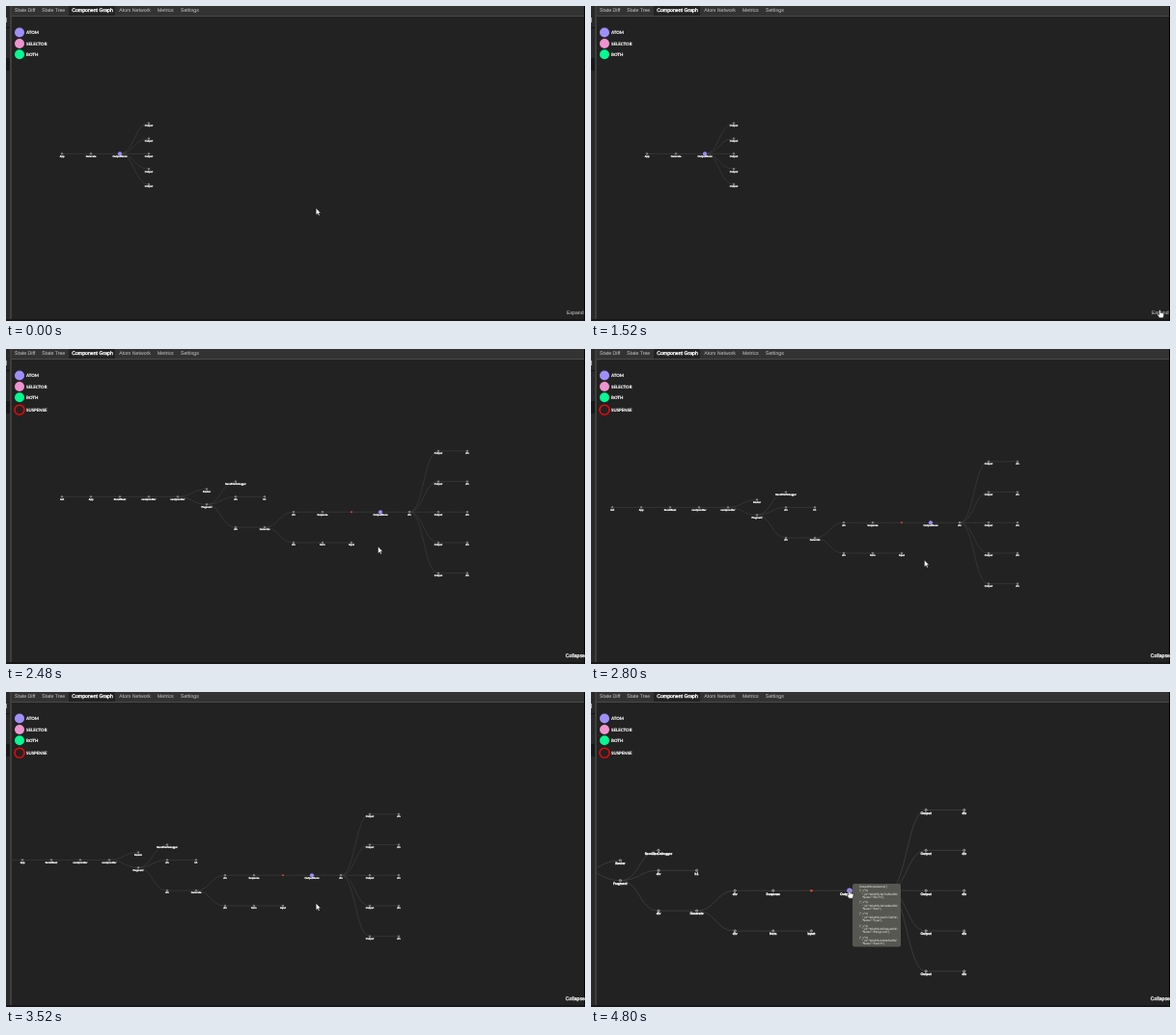
An HTML page that plays this animation: 600x327 px, repeating every 5920 ms.

```html
<!DOCTYPE html>
<html lang="en">
<head>
<meta charset="utf-8">
<title>Component Graph</title>
<style>
html, body { margin: 0; width: 100%; height: 100%; overflow: hidden; background: #222; }
svg { display: block; width: 600px; height: 327px; font-family: "Liberation Sans", Arial, sans-serif; font-size: 5.2px; }
text { text-rendering: geometricPrecision; }
.tab { fill: #b4b4b4; stroke: #b4b4b4; stroke-width: .08px; }
.on { fill: #fff; stroke: #fff; stroke-width: .32px; }
.legend { font: bold 4.4px Lato, sans-serif; fill: #fff; stroke: #fff; stroke-width: .15px; }
.node text { font: bold 2.6px Lato, sans-serif; fill: #fff; stroke: #fff; stroke-width: .22px; text-anchor: middle; }
.node circle { fill: #666; stroke: #bbb; stroke-width: .4px; }
.node .atom { fill: #9a8cff; stroke: none; }
.node .hot { fill: #f0442e; stroke: none; }
.link { fill: none; stroke: #414141; stroke-width: .6px; }
#tip text { font: 3px Lato, sans-serif; fill: #fff; }
</style>
</head>
<body>
<svg viewBox="0 0 600 327">
  <defs><clipPath id="pane"><rect x="6" y="11" width="593" height="314"/></clipPath></defs>
  <rect width="600" height="327" fill="#222"/>
  <rect width="600" height="10" fill="#333"/>
  <rect x="65" width="48" height="10" fill="#222"/>
  <rect y="10" width="600" height="1" fill="#484848"/>
  <rect width="4" height="327" fill="#292929"/>
  <rect y="22" width="4" height="1" fill="#111"/>
  <rect y="54" width="4" height="13" fill="#181818"/>
  <rect y="12" width="1" height="5" fill="#999"/>
  <rect x="4" width="2" height="327" fill="#3d3d3d"/>
  <rect y="325" width="600" height="2" fill="#191717"/>
  <rect x="599" width="1" height="327" fill="#000"/>
  <g id="ui"></g>
  <g clip-path="url(#pane)"><g id="view"></g></g>
  <text id="toggle" y="319.7"></text>
  <g id="tip"><rect x="271" y="199" width="50" height="65.5" rx="2" fill="#575752"/></g>
  <path id="arrow" d="M0 0V7.2L1.7 5.7L2.8 8.1L4 7.6L2.9 5.2H5Z" fill="#fff" stroke="#111" stroke-width=".5"/>
  <path id="hand" d="M-.8 .7Q0-.5 .8 .7V3L3.6 3.6Q4.4 3.9 4.2 5L3.5 8.2H-.4L-2.6 5.2Q-2.6 4.1-1.6 4.5L-.8 5.2Z" fill="#fff" stroke="#111" stroke-width=".5"/>
</svg>
<script>
const LOOP = 5920, STEP = 80, CLICK = 1600, GROW = 750, ROW = 15.85, ROOT = [58, 153.4];
const $ = id => document.getElementById(id);

function add(parent, tag, attrs, text) {
  const el = document.createElementNS("http://www.w3.org/2000/svg", tag);
  for (const k in attrs) el.setAttribute(k, attrs[k]);
  if (text) el.textContent = text;
  return parent.appendChild(el);
}
const show = (el, on) => el.setAttribute("visibility", on ? "visible" : "hidden");

// Tabs and legend
[["State Diff", 9], ["State Tree", 37.3], ["Component Graph", 68.2], ["Atom Network", 117.3], ["Metrics", 157], ["Settings", 181]]
  .forEach(([s, x], i) => add($("ui"), "text", { x, y: 5.5, class: i == 2 ? "tab on" : "tab" }, s));
function legend(y, name, style) {
  const g = add($("ui"), "g", {});
  add(g, "circle", { cx: 14, cy: y, r: 5, ...style });
  add(g, "text", { x: 21, y: y + 1.8, class: "legend" }, name);
  return g;
}
legend(27.5, "ATOM", { fill: "#a08ffa" });
legend(39, "SELECTOR", { fill: "#f094d0" });
legend(50.3, "BOTH", { fill: "#05fa92" });
const suspense = legend(63.2, "SUSPENSE", { fill: "none", stroke: "#e60a0a", "stroke-width": 1.6 });

// A node is [label, column, row, parent index]
const outputs = (col, mid, gap, parent) => [-2, -1, 0, 1, 2].map(i => ["Output", col, mid + i * gap, parent]);
const small = [["App", 0, 0], ["Generate", 1, 0, 0], ["OutputMenu", 2, 0, 1], ...outputs(3, 0, 1, 2)];
const full = [
  ["null", 0, 0], ["App", 1, 0, 0], ["RecoilRoot", 2, 0, 1], ["nextprovider", 3, 0, 2], ["nextprovider", 4, 0, 3],
  ["Router", 5, -.5, 4], ["Fragment", 5, .5, 4], ["RecoilizeDebugger", 6, -1, 6],
  ["div", 6, 0, 6], ["h1", 7, 0, 8], ["div", 6, 2, 6], ["Generate", 7, 2, 10],
  ["div", 8, 1, 11], ["Suspense", 9, 1, 12], ["", 10, 1, 13], ["OutputMenu", 11, 1, 14], ["div", 12, 1, 15],
  ["div", 8, 3, 11], ["form", 9, 3, 17], ["input", 10, 3, 18],
  ...outputs(13, 1, 2, 16),
  ...[0, 1, 2, 3, 4].map(i => ["div", 14, -3 + 2 * i, 20 + i])
];

function buildTree(list) {
  const g = add($("view"), "g", {});
  const links = list.map(() => add(g, "path", { class: "link" }));
  const nodes = list.map(([name]) => {
    const n = add(g, "g", { class: "node" });
    const kind = { OutputMenu: "atom", "": "hot" }[name] || "";
    add(n, "circle", { r: kind == "atom" ? 2.1 : .9, class: kind });
    add(n, "text", { y: 3.3 }, name);
    return n;
  });
  function place(p) {
    const at = ([, c, r]) => [ROOT[0] + 30 * c * p, ROOT[1] + ROW * r * p];
    list.forEach((d, i) => {
      const [x, y] = at(d);
      nodes[i].setAttribute("transform", `translate(${x} ${y})`);
      if (d[3] === undefined) return;
      const [px, py] = at(list[d[3]]), mid = (px + x) / 2;
      links[i].setAttribute("d", `M${px} ${py}C${mid} ${py} ${mid} ${y} ${x} ${y}`);
    });
  }
  place(1);
  return { g, place };
}
const collapsed = buildTree(small), expanded = buildTree(full);

// Tooltip
add($("tip"), "text", { x: 278, y: 203.3 }, "OutputMenu(atoms): [");
["OUT1", "Sort", "Type", "Merge sort", "Search"].forEach((name, i) => {
  const y = 207.2 + i * 12.1, id = "60a9f3c" + (0x3b71d9 + i * 0x1a2f7).toString(16) + "e05b";
  add($("tip"), "text", { x: 278, y }, '{"_v":0,');
  add($("tip"), "text", { x: 281, y: y + 3.3 }, `"_id":"${id}",`);
  add($("tip"), "text", { x: 281, y: y + 6.6 }, `"Name":"${name}"},`);
});

// Keyframes: time followed by values
const pointer = [
  [560, 321.2, 209.7], [1200, 575, 308], [1440, 589.5, 315.5], [1600, 589.5, 315.5], [1840, 476, 256],
  [2400, 385.5, 205], [2480, 385.5, 205], [2560, 381.5, 208], [2800, 345.4, 219], [3120, 310.5, 229],
  [3440, 321.2, 219.2], [3520, 321.2, 219.2], [3760, 301.6, 218.5], [4000, 301.6, 218.5], [4320, 267.8, 206]
];
const camera = [[2560, 0, 0, 1], [2800, -36, 11, 1], [3120, -71, 21, 1], [3520, -71, 21, 1], [3760, -244.2, -17.2, 1.32]];

function sample(keys, t) {
  const i = keys.findIndex(k => k[0] > t);
  if (i == 0) return keys[0].slice(1);
  if (i < 0) return keys[keys.length - 1].slice(1);
  const a = keys[i - 1], b = keys[i], p = (t - a[0]) / (b[0] - a[0]);
  return a.slice(1).map((v, j) => v + (b[j + 1] - v) * p);
}
const ease = p => p < .5 ? 4 * p ** 3 : 1 - (2 - 2 * p) ** 3 / 2;

function draw(t) {
  const open = t >= CLICK;
  show(collapsed.g, !open);
  show(expanded.g, open);
  show(suspense, open);
  if (open) expanded.place(ease(Math.min(1, (t - CLICK) / GROW)));
  const toggle = $("toggle"), ink = open ? "#fff" : "#bbb";
  toggle.textContent = open ? "Collapse" : "Expand";
  toggle.setAttribute("x", open ? 579.8 : 581);
  toggle.setAttribute("fill", ink);
  toggle.setAttribute("stroke", ink);
  toggle.setAttribute("stroke-width", open ? .25 : .08);

  const [tx, ty, k] = sample(camera, t);
  $("view").setAttribute("transform", `translate(${tx} ${ty}) scale(${k})`);

  const [x, y] = sample(pointer, t);
  const hand = t >= 1360 && t <= CLICK || t >= 4240;
  for (const id of ["arrow", "hand"]) {
    $(id).setAttribute("transform", `translate(${x} ${y})`);
    show($(id), hand == (id == "hand"));
  }
  show($("tip"), t >= 4320);
}

const start = performance.now();
function tick() {
  const t = (performance.now() - start) % LOOP;
  draw(Math.floor(t / STEP) * STEP);
  requestAnimationFrame(tick);
}
tick();
</script>
</body>
</html>
```
